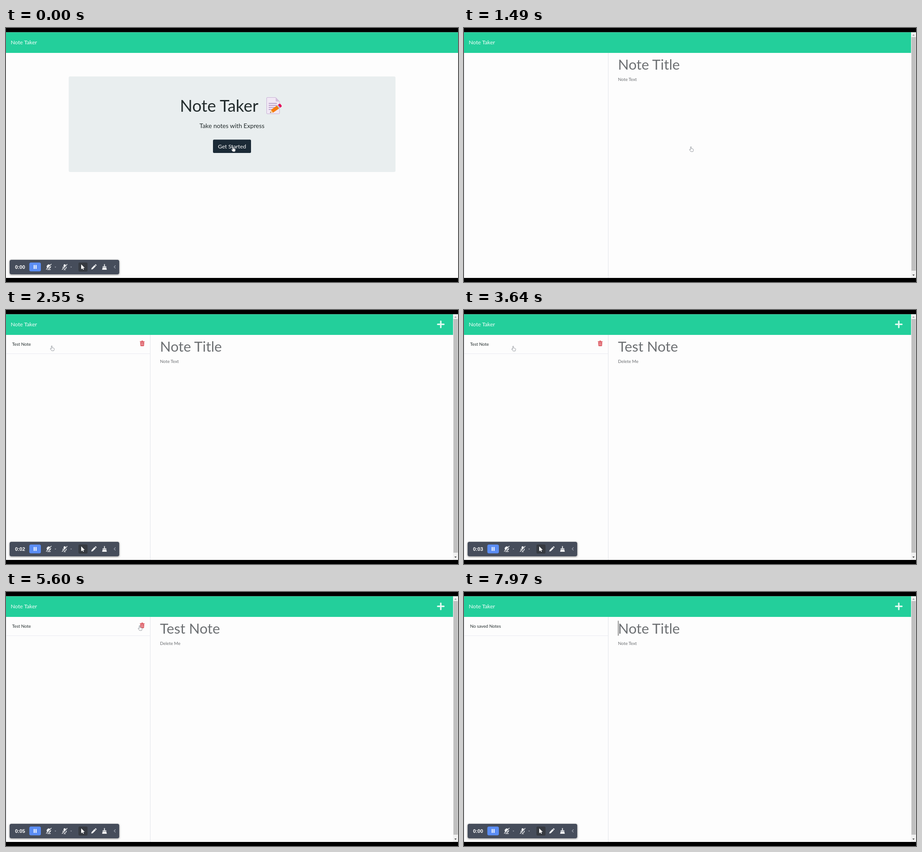
An HTML page for the animation above (8000 ms loop, 998 by 561 pixels).

```html
<!DOCTYPE html>
<html lang="en">
<head>
<meta charset="utf-8">
<title>Note Taker</title>
<style>
  html, body { margin: 0; width: 100%; height: 100%; overflow: hidden; background: #000; }
  svg { display: block; width: 998px; height: 561px; }
  text { font-family: Lato, sans-serif; fill: #222b2c; white-space: pre; }
  .title { font-size: 31.3px; fill: #6d7073; }
  .small { font-size: 9.75px; }
  .gray { fill: #6d7073; }
  .mid { text-anchor: middle; }
  .timer { font: bold 11px "Liberation Sans", Arial, sans-serif; fill: #fff; }
  .bar { filter: drop-shadow(0 1px 2px rgba(0, 0, 0, .45)); }
</style>
</head>
<body>
<svg viewBox="0 0 998 561">
  <rect width="998" height="561" fill="#000"/>
  <rect y="9.5" width="998" height="542.5" fill="#fdfdfd"/>
  <rect y="9.5" width="998" height="45.5" fill="#23cf9b"/>
  <text x="10.5" y="36.3" font-size="12.2" style="fill:#f4fffb">Note Taker</text>

  <g id="home">
    <rect x="138.5" y="107" width="721.5" height="211" rx="3" fill="#e9eeef"/>
    <text x="384" y="184.5" font-size="36.4">Note Taker</text>
    <g id="memo">
      <path d="M577 153.500h18.500l8.500 9v25.500q0 1.500-1.500 1.500h-25.500q-1.500 0-1.500-1.500v-33q0-1.500 1.500-1.500z" fill="#f1e8f5" stroke="#c9b2d6"/>
      <path d="M595.500 153.500v7.500q0 1.500 1.500 1.500h7z" fill="#d3bedd"/>
      <path d="M580 166.500h18M580 171h18M580 175.500h13M580 180h8" stroke="#a98bbd" stroke-width="1.300"/>
      <path d="M583 187.500l2.200-6.800 4.400 6.200z" fill="#f5d09a"/>
      <path d="M583 187.500l.8-2.500 1.500 2.100z" fill="#4a3a3a"/>
      <path d="M585.200 180.700l13-9.400 4.800 6.400-13.400 9.200z" fill="#f57c0d"/>
      <path d="M598.200 171.300l2.400-1.700 4.700 6.500-2.300 1.600z" fill="#b9c4cc"/>
      <path d="M600.600 169.600l2.600-1.900q1.800-1.200 3.100.5l2.200 3.100q1.100 1.700-.6 2.900l-2.600 1.900z" fill="#e4105c"/>
    </g>
    <text class="mid" x="499" y="221.400" font-size="13.7">Take notes with Express</text>
    <rect x="457" y="246.500" width="84" height="29.500" rx="2.500" fill="#1b2a36"/>
    <text class="mid" x="499" y="265.500" font-size="12.3" style="fill:#fff">Get Started</text>
  </g>

  <g id="notes">
    <path d="M.5 55V552M318.500 55V552" stroke="#e3e5e9"/>
    <text id="title" class="title" x="340" y="91.700">Note Title</text>
    <text id="body" class="small gray" x="340" y="116.800">Note Text</text>
    <path id="caret" d="M340.500 63.500V96.500" stroke="#333"/>
    <g id="list">
      <path d="M1 96.500H318" stroke="#e9ebf1"/>
      <text id="item" class="small" x="13.500" y="78.900">Test Note</text>
      <g id="trash" fill="#d8404a">
        <path d="M295.700 69h3.100l.7-1.200h2.500l.7 1.200h3.100v1.500h-10.100z"/>
        <path fill-rule="evenodd" d="M296.300 71.200h8.900l-.5 7.400q-.1 1.200-1.300 1.200h-5.300q-1.200 0-1.300-1.200zM298.300 72.600v5.700h.8v-5.700zM300.400 72.600v5.700h.8v-5.700zM302.500 72.600v5.700h.8v-5.700z"/>
      </g>
      <path d="M960 25v13.500M953.200 31.700h13.600" stroke="#e2fbf2" stroke-width="3.300" stroke-linecap="round"/>
    </g>
    <rect x="987" y="9.500" width="11" height="542.500" fill="#f1f1f1"/>
    <rect x="988" y="20" width="9.500" height="516" fill="#c0c0c0"/>
    <path d="M990 17h5l-2.500-3z" fill="#999"/>
    <path d="M990 544.500h5l-2.500 3z" fill="#444"/>
  </g>

  <g id="bar">
    <rect class="bar" x="8" y="512" width="242" height="32" rx="4" fill="#464d5b"/>
    <text id="timer" class="timer" x="20" y="531.500">0:00</text>
    <rect x="51.500" y="518" width="25.500" height="19.500" rx="3.500" fill="#5b8df4"/>
    <path d="M62.300 523.500v8.500M66.300 523.500v8.500" stroke="#fff" stroke-width="2.200"/>
    <g fill="none" stroke="#f2f3f5" stroke-linecap="round">
      <circle cx="94.500" cy="527" r="4.300" fill="#f2f3f5"/>
      <path d="M91 533.500h7" stroke-width="1.600"/>
      <path d="M90 533L100.500 522" stroke="#464d5b" stroke-width="2.600"/>
      <path d="M89 533L100 521.500" stroke-width="1.300"/>
      <path d="M129.500 524v3.500" stroke-width="4.600"/>
      <path d="M125.500 527.500q0 4 4 4t4-4M129.500 531.500v2.500M127.500 534h4" stroke-width="1.200"/>
      <path d="M125 533.500L135.500 522.500" stroke="#464d5b" stroke-width="2.600"/>
      <path d="M124 533.500L135 522" stroke-width="1.300"/>
    </g>
    <path d="M107.500 527.300h3.200l-1.600 2zM142.200 527.300h3.200l-1.600 2z" fill="#aeb4bf"/>
    <rect x="160" y="518" width="20" height="20" rx="3" fill="#363a41"/>
    <path d="M166 522v11l2.700-2.300 1.600 3.400 1.700-.8-1.600-3.300h3.500z" fill="#fff"/>
    <path d="M188.200 533.600l.8-3.400 6.600-6.600 2.600 2.600-6.600 6.600zM196.300 522.900l.9-.9q.6-.5 1.200 0l1.400 1.400q.5.600 0 1.200l-.9.900z" fill="#f2f3f5"/>
    <path d="M216.500 521.500h1.800v5h3.200v2h-8.200v-2h3.200zM213.200 529.300h8.400l1 4.700h-10.400z" fill="#f2f3f5"/>
    <path d="M241.800 524.500l-3.200 3.200 3.200 3.200" fill="none" stroke="#a3a9b4" stroke-width="1.200"/>
  </g>

  <g id="pointer">
    <path id="hand" d="M-.9 .6Q0-.6.9.6V4.300L4 5q1.800.5 1.700 2.300L5 9.500 4.600 11H-.2L-3 7.300q-.6-1.200.5-1.400L-.9 7z" fill="#fff" stroke="#7c8088" stroke-width=".8" stroke-linejoin="round"/>
    <path id="beam" d="M-1.500 0h3M0 0v11M-1.500 11h3" stroke="#555" stroke-width=".9"/>
  </g>
</svg>
<script>
const LOOP = 8000;
const OPEN = 1430, LOADED = 1570, BAR_BACK = 1700;
const PICK = 3000, DELETE = 5760, FOCUS = 6870;

// time, x, y of the pointer tip
const PATH = [
  [0, 501, 262], [1750, 501, 262], [2450, 101, 79], [3560, 101, 79],
  [4300, 325, 98], [4650, 309, 93], [5150, 295, 74], [6080, 295, 74],
  [6750, 417, 76], [LOOP, 417, 76]
];

const $ = id => document.getElementById(id);
const show = (id, on) => { $(id).style.display = on ? '' : 'none'; };
const write = (id, s) => { if ($(id).textContent !== s) $(id).textContent = s; };
const ease = p => p * p * (3 - 2 * p);

function pointerAt(t) {
  const i = PATH.findIndex(k => k[0] > t);
  const [t0, x0, y0] = PATH[i - 1], [t1, x1, y1] = PATH[i];
  const p = ease((t - t0) / (t1 - t0));
  return [x0 + (x1 - x0) * p, y0 + (y1 - y0) * p];
}

function render(t) {
  const picked = t >= PICK && t < DELETE;
  show('home', t < OPEN);
  show('notes', t >= OPEN);
  show('list', t >= LOADED);
  show('trash', t < DELETE);
  show('bar', t < OPEN || t >= BAR_BACK);
  show('caret', t >= FOCUS && Math.floor((t - FOCUS) / 500) % 2 === 0);
  write('title', picked ? 'Test Note' : 'Note Title');
  write('body', picked ? 'Delete Me' : 'Note Text');
  write('item', t < DELETE ? 'Test Note' : 'No saved Notes');
  write('timer', '0:0' + Math.floor((t + 50) / 1000) % 8);

  const [x, y] = pointerAt(t);
  const typing = t > DELETE && x > 320;
  $('pointer').setAttribute('transform', `translate(${x.toFixed(1)} ${y.toFixed(1)})`);
  show('pointer', t < FOCUS);
  show('hand', !typing);
  show('beam', typing);
}

const start = performance.now();
function tick() {
  render((performance.now() - start) % LOOP);
  requestAnimationFrame(tick);
}
tick();
</script>
</body>
</html>
```
